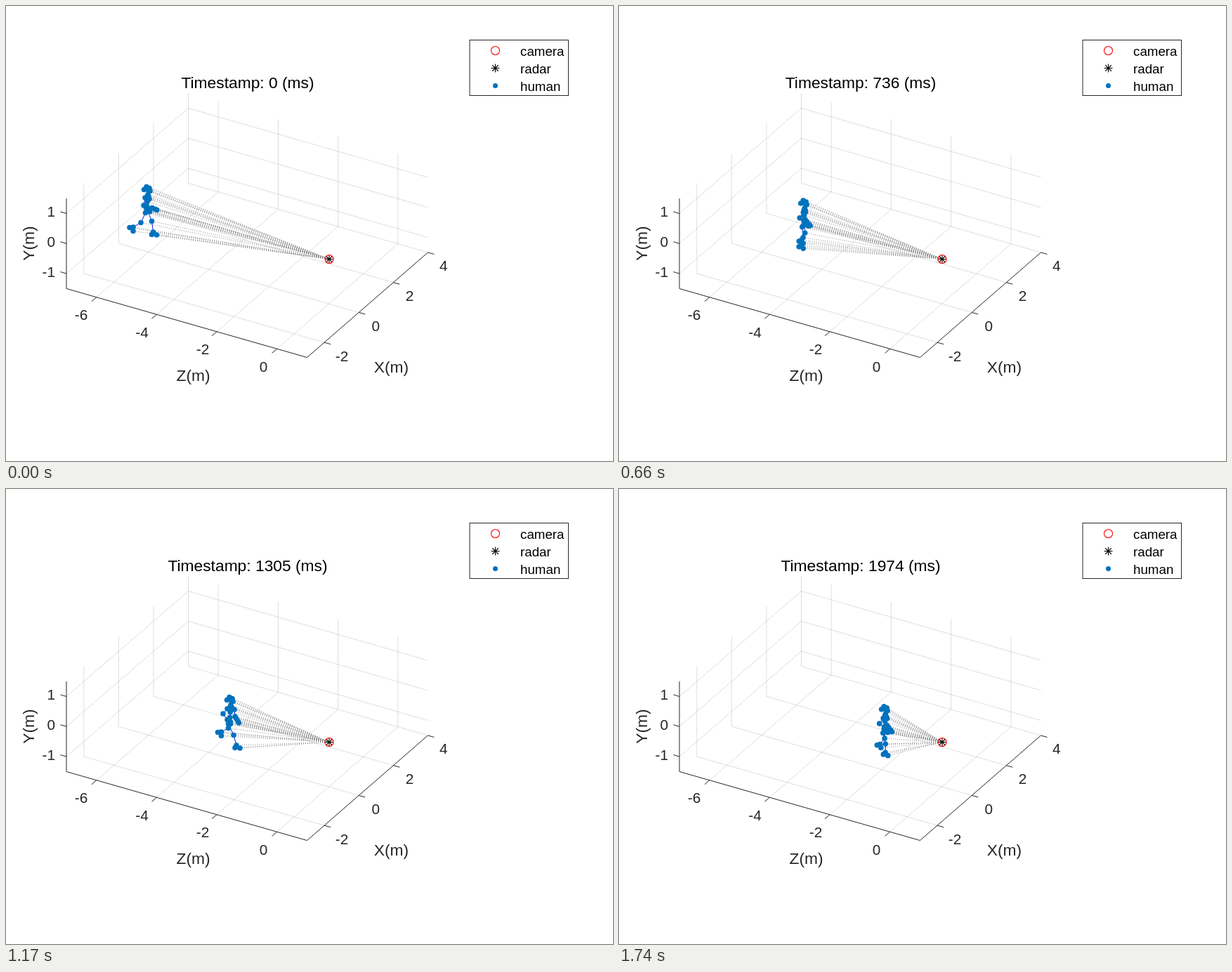
Recreate the animation shown at these times as an HTML page with a canvas. Size 864 px wide and 648 px high, loop 1770 ms.

```html
<!DOCTYPE html>
<html lang="en">
<head>
<meta charset="utf-8">
<title>Walking skeleton</title>
<style>
html, body { margin: 0; overflow: hidden; background: #fff; }
canvas { display: block; }
</style>
</head>
<body>
<canvas id="stage" width="864" height="648"></canvas>
<script>
const ctx = document.getElementById('stage').getContext('2d');
const DARK = '#262626', BLUE = '#0072bd';
const FRAME = 30, FRAMES = 59, SKIP_AT = 53, STEP_MS = 33.46;
const radar = [460, 360.5];

// Each heel strike: data sample and pelvis position; left and right alternate.
const strikes = [[0, 200, 293], [16, 241, 308], [29, 287, 319],
  [39, 318, 333], [48, 350, 335], [65, 392, 352]];

const mix = (a, b, t) => a.map((v, i) => v + (b[i] - v) * t);
const add = (p, x, y) => [p[0] + x, p[1] + y];

function line(points, color, width = 1) {
  ctx.beginPath();
  points.forEach(p => ctx.lineTo(p[0], p[1]));
  ctx.strokeStyle = color;
  ctx.lineWidth = width;
  ctx.stroke();
}

function dot(p, r) {
  ctx.beginPath();
  ctx.arc(p[0], p[1], r, 0, 2 * Math.PI);
  ctx.fillStyle = BLUE;
  ctx.fill();
}

function ring([x, y]) {
  ctx.beginPath();
  ctx.arc(x, y, 6, 0, 2 * Math.PI);
  ctx.strokeStyle = '#f00';
  ctx.lineWidth = 1.1;
  ctx.stroke();
}

function star([x, y]) {
  for (let i = 0; i < 4; i++) {
    const a = i * Math.PI / 4, dx = 6 * Math.cos(a), dy = 6 * Math.sin(a);
    line([[x - dx, y - dy], [x + dx, y + dy]], '#000', 1.1);
  }
}

function text(s, x, y, size, align = 'center', color = DARK) {
  ctx.font = `${size}px "Liberation Sans", Arial, sans-serif`;
  ctx.textAlign = align;
  ctx.fillStyle = color;
  ctx.fillText(s, x, y);
}

// Floor corners; the box spans X -3..4, Y -1.5..1.5, Z -7..1.
const near = [[86, 402.5], [428.5, 500.5]], far = [[259.5, 252.5], [600.5, 351]];
function project(x, y, z) {
  const u = (z + 7) / 8;
  const p = mix(mix(...near, u), mix(...far, u), (x + 3) / 7);
  return add(p, 0, -(y + 1.5) * 42.8);
}

function axes() {
  const grid = '#26262626', xs = [-2, 0, 2, 4], ys = [-1, 0, 1], zs = [-6, -4, -2, 0];
  xs.forEach(x => line([project(x, 1.5, -7), project(x, -1.5, -7), project(x, -1.5, 1)], grid));
  zs.forEach(z => line([project(-3, -1.5, z), project(4, -1.5, z), project(4, 1.5, z)], grid));
  ys.forEach(y => line([project(-3, y, -7), project(4, y, -7), project(4, y, 1)], grid));
  line([project(-3, 1.5, -7), ...near, far[1]], DARK);

  const tick = (p, dx, dy) => line([p, add(p, dx, dy)], DARK);
  ys.forEach(y => {
    tick(project(-3, y, -7), -8.5, -2.5);
    text(y, 70, 342.5 - y * 43, 20.8, 'right');
  });
  zs.forEach((z, i) => {
    tick(project(-3, -1.5, z), -7, 6);
    text(z, 107 + i * 86.5, 447 + i * 24.7, 20.8);
  });
  xs.forEach((x, i) => {
    tick(project(x, -1.5, 1), 9, 2.5);
    text(x, 478 + i * 48.3, 505.5 - i * 42.8, 20.8);
  });
  text('Z(m)', 266.5, 534, 22.8);
  text('X(m)', 548.5, 521.5, 22.8);
  ctx.save();
  ctx.translate(40, 338);
  ctx.rotate(-Math.PI / 2);
  text('Y(m)', 0, 0, 22.8);
  ctx.restore();
}

function legend() {
  ctx.strokeStyle = DARK;
  ctx.lineWidth = 1;
  ctx.strokeRect(660, 48.5, 140.5, 79);
  ring([696.5, 63.5]);
  star([696.5, 88.5]);
  dot([696.5, 113.5], 3.5);
  ['camera', 'radar', 'human'].forEach((s, i) =>
    text(s, 732, 71 + i * 25, 18.75, 'left', '#000'));
}

function arm(shoulder, elbow, wrist) {
  const dx = wrist[0] - elbow[0], dy = wrist[1] - elbow[1];
  const len = Math.hypot(dx, dy);
  const reach = d => add(wrist, dx / len * d, dy / len * d);
  return [shoulder, elbow, wrist, reach(4.5), reach(7.5)];
}

function leg(hip, knee, ankle, lift) {
  const heel = add(ankle, ...mix([-2, 3.5], [-5, 0.5], lift));
  const toe = add(ankle, ...mix([5, 4], [0, 5.5], lift));
  return [hip, knee, ankle, heel, toe];
}

function human(k) {
  let i = strikes.findIndex(s => s[0] > k) - 1;
  const from = strikes[i], to = strikes[i + 1];
  const t = (k - from[0]) / (to[0] - from[0]);
  const pelvis = mix(from, to, t).slice(1);
  const gait = Math.cos(Math.PI * (i + t)); // 1: left foot in front, -1: right foot
  const swing = (x, y, ax, ay) => add(pelvis, x + ax * gait, y + ay * gait);

  const head = swing(0, -36, 0, 0.5), neck = add(head, 2, 11);
  const spine = s => mix(neck, pelvis, s);
  const armR = arm(swing(0.5, -19, 3.5, 1), swing(-4.5, -11, 4.5, 2), swing(2.5, -5, 5.5, -0.5));
  const armL = arm(swing(2.5, -19.5, -4.5, -0.5), swing(2, -9, -6, 0), swing(4.5, -6, -5, 0.5));
  const legR = leg(add(pelvis, -1.5, 1.5), swing(-1, 16.5, -7, -1),
    swing(-4.5, 27, -14.5, -5), (1 + gait) / 2);
  const legL = leg(add(pelvis, 1.5, -1.5), swing(3, 10.5, 4.5, 3),
    swing(-1, 21, 10.5, 8), (1 - gait) / 2);
  const bones = [
    [neck, spine(0.4), spine(0.7), pelvis],
    [neck, add(neck, -1, 3), ...armR],
    [neck, add(neck, 1, 3), ...armL],
    [pelvis, ...legR],
    [pelvis, ...legL],
    [neck, add(head, 2, 4), head, add(head, -3.5, 4), add(head, 4, 2), add(head, 5, 6)]
  ];
  const joints = bones.flatMap((b, j) => j ? b.slice(1) : b);
  ctx.setLineDash([1, 2]);
  joints.forEach(j => line([radar, j], '#8a8a8a'));
  ctx.setLineDash([]);
  bones.forEach(b => line(b, '#1010f0'));
  joints.forEach(j => dot(j, 3.8));
}

function draw(now) {
  const n = Math.floor(now / FRAME) % FRAMES;
  const k = n + (n >= SKIP_AT ? 1 : 0); // one sample is missing
  ctx.fillStyle = '#fff';
  ctx.fillRect(0, 0, 864, 648);
  axes();
  human(k);
  star(radar);
  ring(radar);
  legend();
  text(`Timestamp: ${Math.round(k * STEP_MS)} (ms)`, 344, 117, 22.8, 'center', '#000');
}

function loop() {
  draw(performance.now());
  requestAnimationFrame(loop);
}
loop();
</script>
</body>
</html>
```
